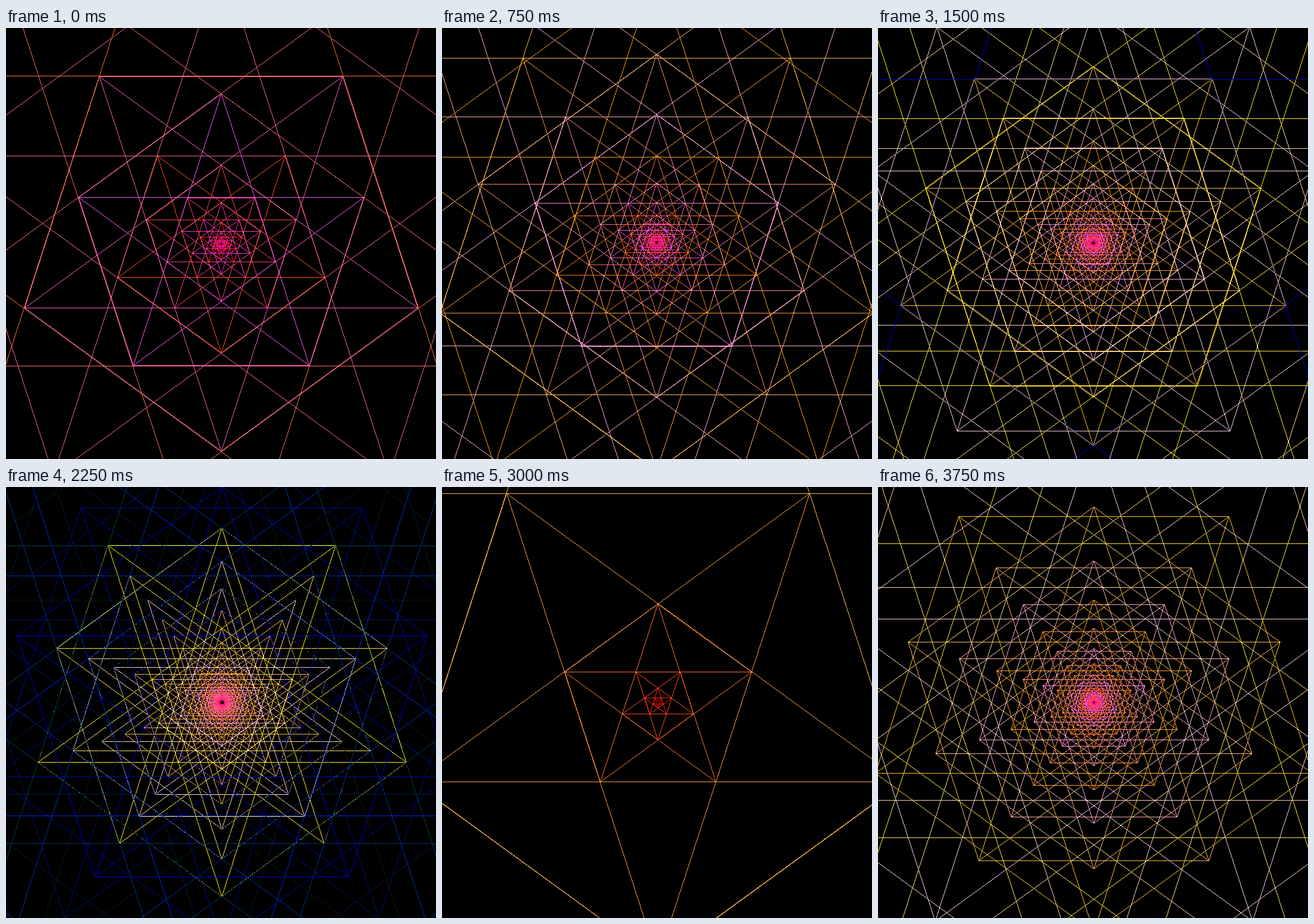
Write an HTML page with a canvas that moves like this. It is 748 by 749 pixels and loops after 4500 ms.

```html
<!DOCTYPE html>
<html>
<head>
<meta charset="utf-8">
<title>Nested pentagrams</title>
<style>
html, body { margin: 0; width: 100%; height: 100%; overflow: hidden; background: #000; }
canvas { display: block; }
</style>
</head>
<body>
<canvas id="stage" width="748" height="749"></canvas>
<script>
const W = 748, H = 749, HOLD = 750;
const ctx = document.getElementById('stage').getContext('2d');

// radius of star n is r0 * exp(growth * n); its colour is red plus n * step, as a 24-bit number
const scenes = [
  { cx: 373.9, cy: 375, r0: 7.578, growth: 0.32172, count: 16, step: 2000 },
  { cx: 373.1, cy: 372.4, r0: 8.47, growth: 0.1923, count: 26, step: 2000 },
  { cx: 374.2, cy: 373.1, r0: 10.003, growth: 0.136975, count: 34, step: 2000 },
  { cx: 375.2, cy: 373.82, r0: 11.05, growth: 0.1068, count: 42, step: 2000 },
  { cx: 375.3, cy: 373.8, r0: 9.497, growth: 0.9636, count: 6, step: 10000 },
  { cx: 375.3, cy: 374, r0: 6.033, growth: 0.161268, count: 32, step: 2000 }
];

// One-pixel line without smoothing
function drawLine(pixels, [x0, y0], [x1, y1], color) {
  const steps = Math.max(Math.abs(x1 - x0), Math.abs(y1 - y0), 1);
  for (let i = 0; i <= steps; i++) {
    const x = Math.round(x0 + (x1 - x0) * i / steps);
    const y = Math.round(y0 + (y1 - y0) * i / steps);
    if (x >= 0 && x < W && y >= 0 && y < H) pixels[y * W + x] = color;
  }
}

function render({ cx, cy, r0, growth, count, step }) {
  const image = ctx.createImageData(W, H);
  const pixels = new Uint32Array(image.data.buffer).fill(0xff000000);
  for (let n = 0; n < count; n++) {
    const rgb = (0xff0000 + n * step) & 0xffffff;
    const color = (0xff000000 | (rgb & 255) << 16 | (rgb & 0xff00) | rgb >> 16) >>> 0;
    const radius = r0 * Math.exp(growth * n) * (n % 2 ? 1 : -1);
    const points = Array.from({ length: 5 }, (_, i) => {
      const angle = i * Math.PI * 2 / 5;
      return [Math.round(cx + radius * Math.sin(angle)), Math.round(cy - radius * Math.cos(angle))];
    });
    // skip 1 gives the pentagon, skip 2 the star
    for (const skip of [1, 2]) {
      points.forEach((p, i) => drawLine(pixels, p, points[(i + skip) % 5], color));
    }
  }
  return image;
}

const images = scenes.map(render);
const start = performance.now();
let shown = -1;

function tick() {
  const index = Math.floor((performance.now() - start) / HOLD) % images.length;
  if (index !== shown) ctx.putImageData(images[shown = index], 0, 0);
  requestAnimationFrame(tick);
}
tick();
</script>
</body>
</html>
```
